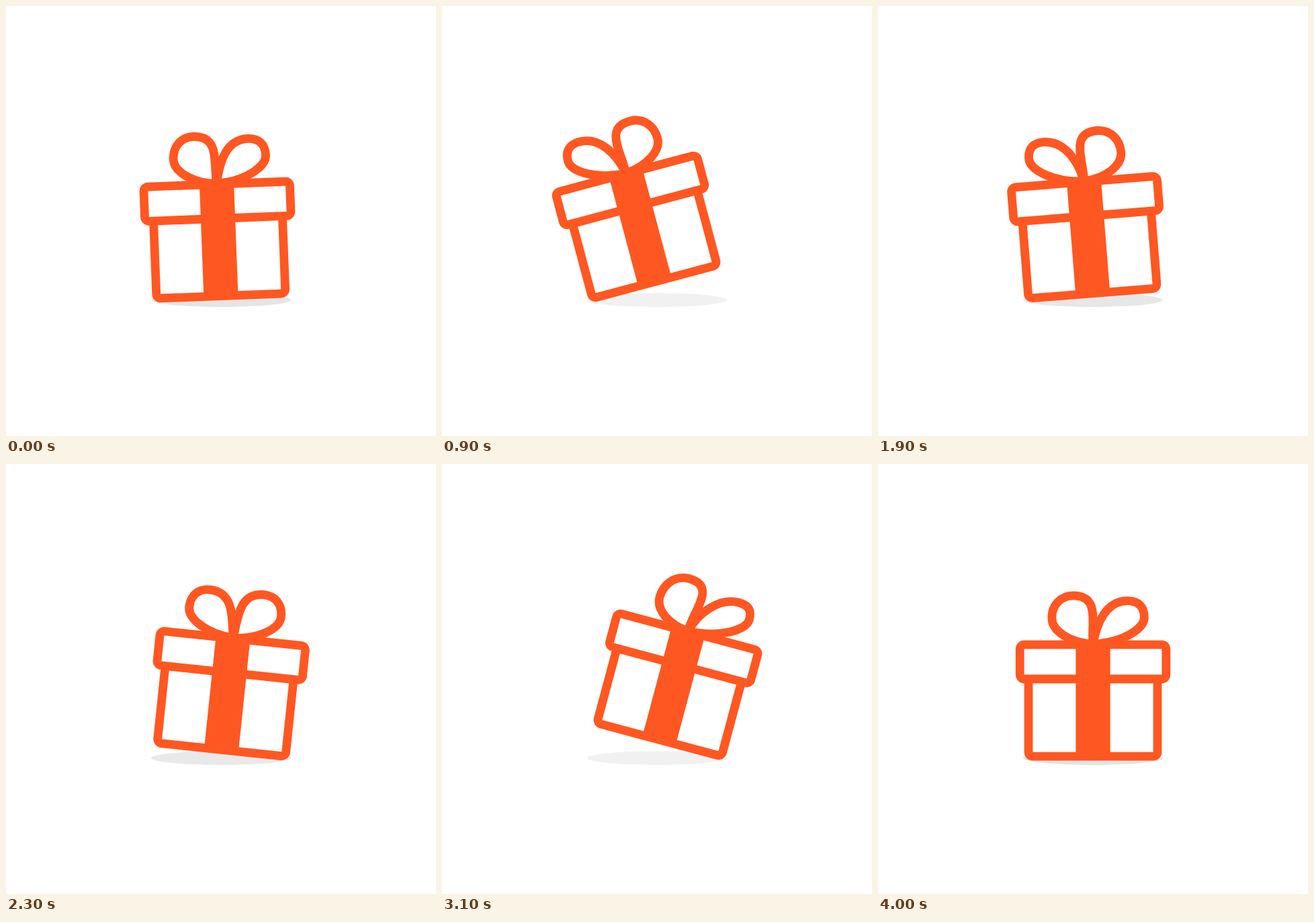
These frames come from a looping animation (640 px wide and 640 px high, 4.1 s). An HTML page:

```html
<!DOCTYPE html>
<html lang="en">
<head>
<meta charset="utf-8">
<title>Rocking gift</title>
<style>
  html, body { margin: 0; width: 100%; height: 100%; overflow: hidden; background: #fff; }
  svg { display: block; width: 100vw; height: 100vh; }
  .line { fill: #fff; stroke: #ff5722; stroke-width: 12.8; stroke-linejoin: round; }
  .bow { fill: none; }
</style>
</head>
<body>
<svg viewBox="0 0 640 640">
  <ellipse id="shadow" cx="320" cy="437.6" rx="104" ry="10.3"/>
  <g id="gift">
    <path id="left" class="line bow"/>
    <path id="right" class="line bow" transform="matrix(-1 0 0 1 640 0)"/>
    <rect class="line" x="224" y="300" width="192" height="135.2" rx="6.4"/>
    <rect class="line" x="211.2" y="268.8" width="217.6" height="51.2" rx="6.4"/>
    <rect x="294.4" y="264" width="51.2" height="175" fill="#ff5722"/>
  </g>
</svg>
<script>
  const LOOP = 4100, STEP = 100, MAX_TILT = 15;

  const rise = u => Math.sin(u * Math.PI / 2);
  const fall = u => u ** 3;
  const swing = u => (1 - Math.cos(u * Math.PI)) / 2;

  // Keys: time in ms, value, easing towards that value
  const tilt = [[-100, 0], [960, -MAX_TILT, rise], [2020, 0, fall], [3090, MAX_TILT, rise], [4000, 0, fall]];
  const sway = [[-900, 1], [1500, -.95, swing], [3200, 1, swing], [5600, -.95, swing]];

  // Control points of the left loop, leaning in and leaning out
  const round = [318, 238, 346, 192, 301, 192, 280, 192, 266, 210, 266, 230, 290, 266];
  const narrow = [313, 236, 286, 207.5, 258, 207.5, 245, 207.5, 236.5, 212, 236.5, 228, 272, 266];

  const $ = id => document.getElementById(id);

  function valueAt(keys, t) {
    const i = keys.findIndex(([time], k) => k > 0 && t <= time);
    const [t0, from] = keys[i - 1], [t1, to, ease] = keys[i];
    return from + (to - from) * ease((t - t0) / (t1 - t0));
  }

  function loopPath(lean) {
    const p = round.map((r, i) => narrow[i] + (r - narrow[i]) * (1 + lean) / 2);
    return `M320 268C${p.slice(0, 12)}S${p.slice(12)} 320 268Z`;
  }

  function draw(now) {
    const t = Math.floor((now % LOOP) / STEP) * STEP;
    const angle = valueAt(tilt, t), lean = valueAt(sway, t);
    const pivot = angle < 0 ? 224 : 416;
    $('gift').setAttribute('transform', `rotate(${angle} ${pivot} 435.2)`);
    $('left').setAttribute('d', loopPath(lean));
    $('right').setAttribute('d', loopPath(-lean));
    $('shadow').setAttribute('fill-opacity', .11 - .055 * Math.abs(angle) / MAX_TILT);
  }

  const start = performance.now();
  function tick() {
    draw(performance.now() - start);
    requestAnimationFrame(tick);
  }
  tick();
</script>
</body>
</html>
```
